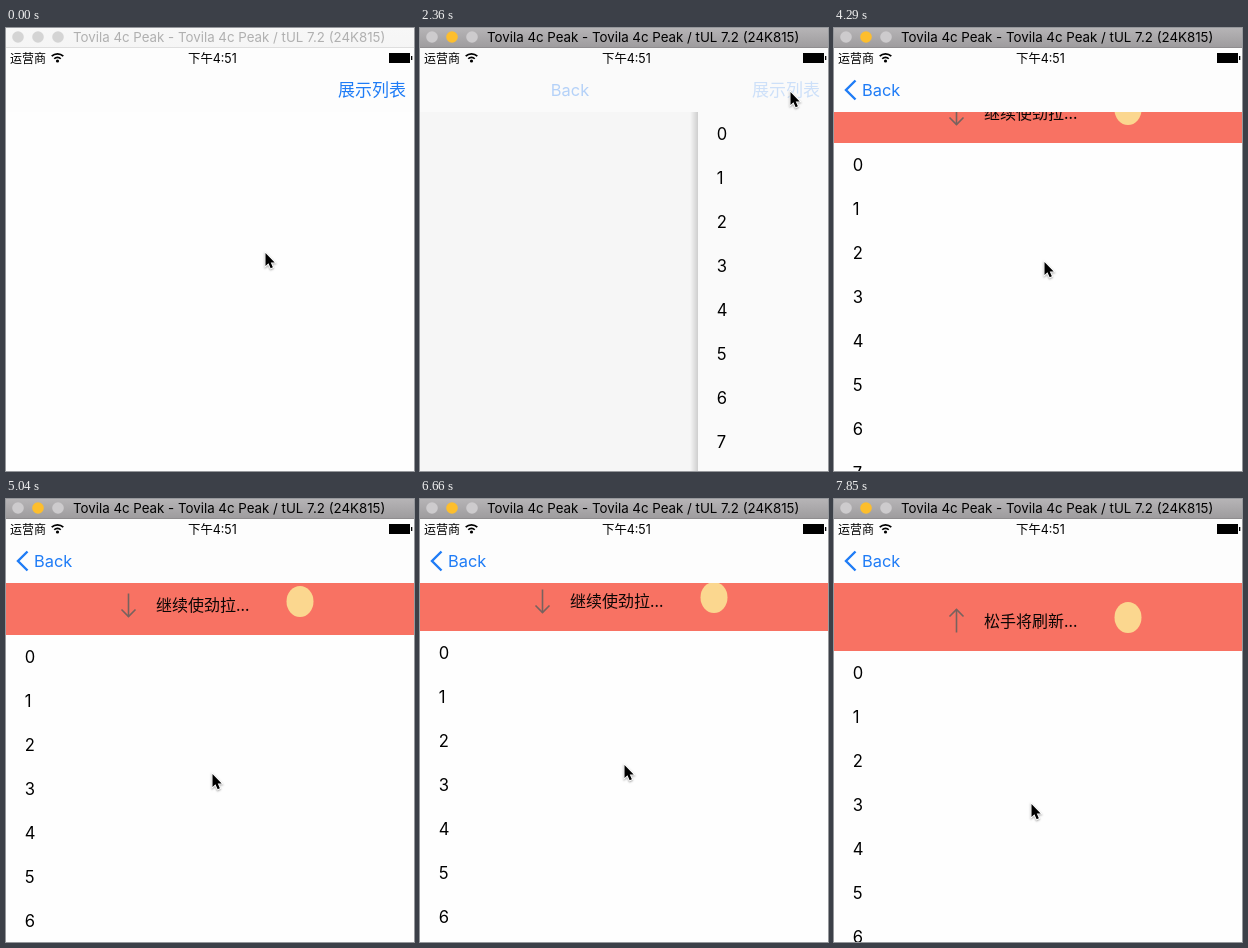
Write an HTML page with a canvas that moves like this. It is 408x443 px and loops after 8000 ms.

```html
<!DOCTYPE html>
<html lang="zh">
<head>
<meta charset="utf-8">
<title>Pull to refresh</title>
<style>
html, body { margin: 0; width: 100%; height: 100%; overflow: hidden; background: #fefefe; }
canvas { display: block; width: 100%; height: 100%; }
</style>
</head>
<body>
<canvas id="stage" width="408" height="443"></canvas>
<script>
const W = 408, H = 443, TOP = 84, ROW = 44;
const LOOP = 8000, STEP = 148;
const CLICK = 1200, TAP = 2210, DRAG = 3550;
const ctx = document.getElementById('stage').getContext('2d');
const FONT = 'Inter, "Noto Sans CJK SC", "Noto Sans CJK", sans-serif';
const CJK = '"Noto Sans CJK SC", "Noto Sans CJK", sans-serif';
const BLUE = '#1f7cf6', CORAL = '#f87263', ARROW = '#77625e';
const TITLE = 'Tovila 4c Peak - Tovila 4c Peak / tUL 7.2 (24K815)';

// Pointer moves in order, each from where the last one ended
const moves = [
  { from: 150, to: 450, x: 288, y: 205 },
  { from: 910, to: CLICK, x: 300, y: 282 },
  { from: 1350, to: 1910, x: 370, y: 64 },
  { from: 2510, to: 2950, x: 217, y: 172 },
  { from: DRAG, to: 4590, x: 209, y: 245 },
  { from: 4740, to: 5630, x: 202, y: 321 },
  { from: 6070, to: 7110, x: 205, y: 240 },
  { from: 7260, to: 7850, x: 197, y: 305 }
];

const clamp = (v, a, b) => Math.min(b, Math.max(a, v));
const smooth = p => p * p * (3 - 2 * p);
const stepsSince = (t, from) => Math.floor((t - from + 2) / STEP);

function pointerAt(t) {
  let x = 259, y = 225;
  for (const m of moves) {
    if (t < m.from) break;
    const count = Math.round((m.to - m.from) / STEP) + 1;
    const p = smooth(clamp((stepsSince(t, m.from) + 1) / count, 0, 1));
    x += (m.x - x) * p;
    y += (m.y - y) * p;
  }
  return [Math.round(x), Math.round(y)];
}

// Left edge of the pushed page: a critically damped spring
function pageLeft(t) {
  const k = 0.013 * Math.max(0, stepsSince(t, TAP) * STEP - 60);
  return Math.floor(W * (1 + k) * Math.exp(-k));
}

function rect(x, y, w, h, fill) {
  ctx.fillStyle = fill;
  ctx.fillRect(x, y, w, h);
}

function disc(x, y, rx, ry, fill) {
  ctx.fillStyle = fill;
  ctx.beginPath();
  ctx.ellipse(x, y, rx, ry, 0, 0, Math.PI * 2);
  ctx.fill();
}

function text(str, x, y, size, fill, family = FONT) {
  ctx.font = `${size}px ${family}`;
  ctx.fillStyle = fill;
  ctx.fillText(str, x, y);
}

function line(width, color, ...points) {
  ctx.strokeStyle = color;
  ctx.lineWidth = width;
  ctx.beginPath();
  points.forEach(([x, y]) => ctx.lineTo(x, y));
  ctx.stroke();
}

function fade(alpha, draw) {
  ctx.globalAlpha = clamp(alpha, 0, 1);
  draw();
  ctx.globalAlpha = 1;
}

function titleBar(active) {
  const g = ctx.createLinearGradient(0, 0, 0, 20);
  g.addColorStop(0, active ? '#b6b4b6' : '#f7f7f7');
  g.addColorStop(1, active ? '#9d9b9d' : '#f5f5f5');
  rect(0, 0, W, 20, g);
  rect(0, 19, W, 1, active ? '#8f8d8f' : '#dedede');
  const off = active ? '#cdcbcd' : '#d4d4d4';
  for (let i = 0; i < 3; i++) disc(12 + 20 * i, 9, 5.8, 5.8, active && i === 1 ? '#fdbe2d' : off);
  text(TITLE, 67, 14, 13.3, active ? '#000' : '#b0b0b0');
}

function statusBar() {
  text('运营商', 4, 34.5, 12, '#000', CJK);
  text('下午4:51', 182, 34.5, 12.4, '#000');
  ctx.strokeStyle = '#000';
  ctx.lineWidth = 1.7;
  for (const r of [4.6, 8.2]) {
    ctx.beginPath();
    ctx.arc(51.5, 34, r, -Math.PI * 0.75, -Math.PI * 0.25);
    ctx.stroke();
  }
  disc(51.5, 33, 1.6, 1.6, '#000');
  rect(383, 25, 21, 10, '#000');
  rect(405, 28, 1.3, 4, '#000');
}

function navBar(t, x) {
  const p = 1 - x / W;
  rect(0, 20, W, TOP - 20, p > 0 && p < 1 ? '#fafafa' : '#fdfdfd');
  statusBar();
  fade(t < TAP ? 1 : 0.3 * (1 - p), () => text('展示列表', 332, 68.3, 17, BLUE, CJK));
  fade(p, () => text('Back', 28 + x * 0.37, 68, 16.4, BLUE));
  fade((p - 0.4) / 0.6, () => line(2.4, BLUE, [21.5, 52.5], [12, 62], [21.5, 71.5]));
}

function refreshHeader(pull) {
  const mid = TOP + pull - 30, ready = pull > 60, s = ready ? -1 : 1;
  const tip = [122.5, mid + 11.5 * s], barb = mid + 4.5 * s;
  rect(0, TOP, W, pull, CORAL);
  line(1.6, ARROW, [122.5, mid - 11.5 * s], tip);
  line(1.6, ARROW, [115.5, barb], tip, [129.5, barb]);
  text(ready ? '松手将刷新...' : '继续使劲拉...', 150, mid + 6, 16, '#0c0605', CJK);
  disc(294, mid - 3.5, 13.5, 15.5, '#fbd78f');
}

function page(x, pull) {
  if (x > 0) {
    const g = ctx.createLinearGradient(x - 8, 0, x, 0);
    g.addColorStop(0, 'rgba(0,0,0,0)');
    g.addColorStop(1, 'rgba(0,0,0,0.16)');
    rect(x - 8, TOP, 8, H, g);
  }
  rect(x, TOP, W - x, H, x > 0 ? '#fafafa' : '#fefefe');
  if (pull > 0) refreshHeader(pull);
  for (let i = 0; i * ROW < H - TOP; i++) {
    text(i, x + 18.8, TOP + pull + 28 + ROW * i, 16.6, '#000');
  }
}

function cursor(x, y) {
  ctx.save();
  ctx.translate(x + 0.5, y);
  ctx.scale(0.92, 0.92);
  ctx.beginPath();
  [[0, 0], [0, 14], [3.2, 11.2], [5.6, 16.6], [8, 15.6], [5.7, 10.4], [10, 10.2]]
    .forEach(([a, b]) => ctx.lineTo(a, b));
  ctx.closePath();
  ctx.shadowColor = 'rgba(0,0,0,0.35)';
  ctx.shadowBlur = 2;
  ctx.shadowOffsetY = 1;
  ctx.strokeStyle = '#fff';
  ctx.lineWidth = 2;
  ctx.stroke();
  ctx.shadowColor = 'transparent';
  ctx.fillStyle = '#000';
  ctx.fill();
  ctx.restore();
}

function render(t) {
  const [px, py] = pointerAt(t);
  const x = pageLeft(t);
  const pull = t < DRAG ? 0 : Math.round(1 + (py - 175) * 0.513);
  rect(0, 0, W, H, '#fefefe');
  if (x < W) {
    rect(0, TOP, W, H, `rgba(0,0,0,${0.1 * (1 - x / W)})`);
    page(x, pull);
  }
  navBar(t, x);
  titleBar(t >= CLICK);
  cursor(px, py);
}

const start = performance.now();
function tick() {
  render((performance.now() - start) % LOOP);
  requestAnimationFrame(tick);
}
tick();
</script>
</body>
</html>
```
